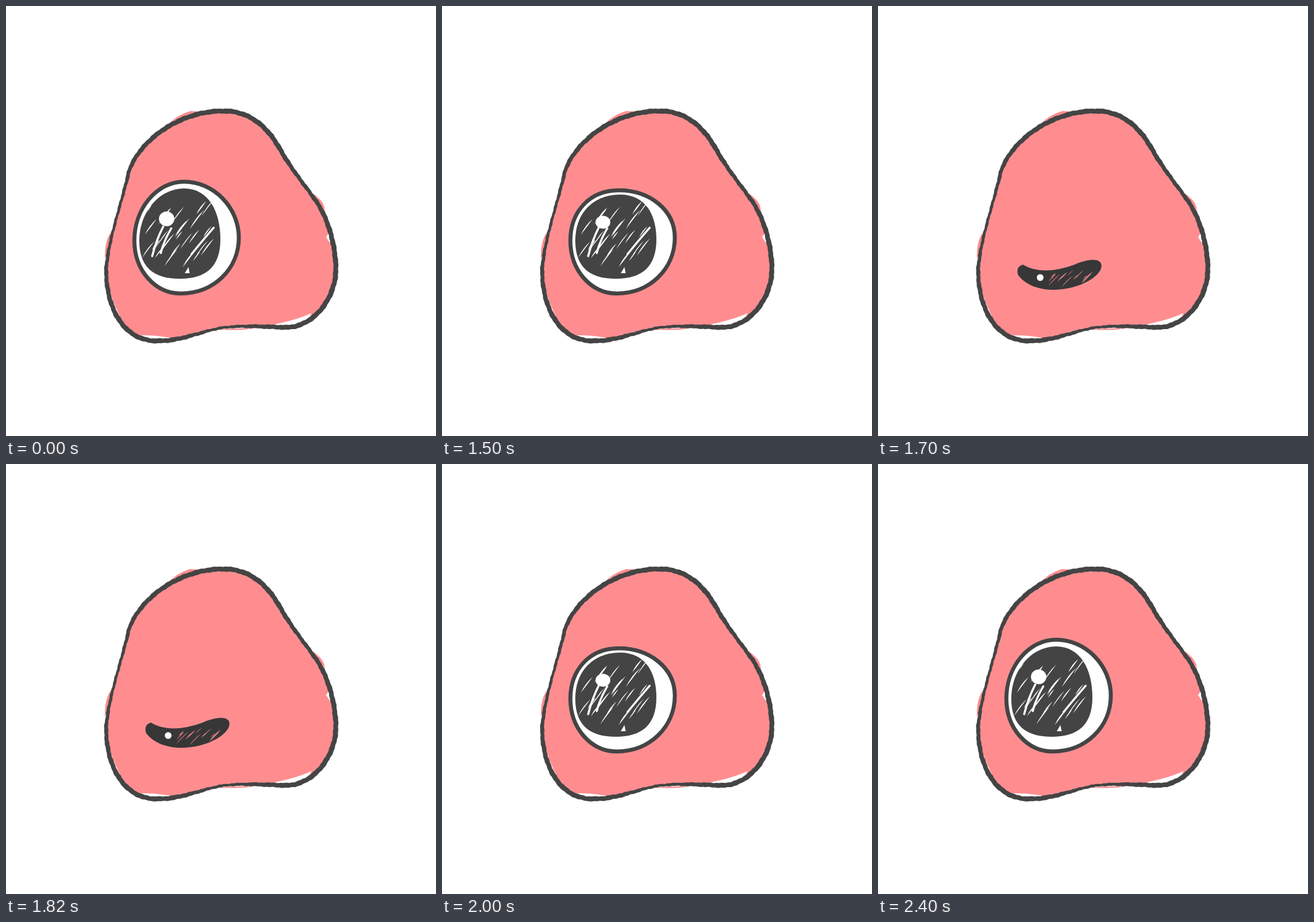
Recreate the animation shown at these times as an HTML page. Size 700x700 px, loop 2600 ms.

```html
<!DOCTYPE html>
<html lang="en">
<head>
<meta charset="utf-8">
<title>Blinking blob</title>
<style>
  html, body { margin: 0; width: 100%; height: 100%; overflow: hidden; background: #fff; }
  svg { display: block; width: 100vw; height: 100vh; }
  .ink { fill: #444; }
  .dark { fill: #373737; }
  .white { fill: #fff; }
  .skin { fill: #ff8d90; }
  .rim { fill: #fff; stroke: #444; stroke-width: 6.5; }
  .glint { fill: none; stroke: #fff; stroke-width: 3.4; stroke-linecap: round; }
  .pose { visibility: hidden; animation: 2600ms step-end infinite; }
  .open { animation-name: open; }
  .squint { animation-name: squint; }
  .half { animation-name: half; }
  .shut { animation-name: shut; }
  @keyframes open {
    0%, 80.769%, 100% { visibility: visible; }
    57.692% { visibility: hidden; }
  }
  @keyframes squint {
    0%, 61.538%, 80.769%, 100% { visibility: hidden; }
    57.692%, 76.923% { visibility: visible; }
  }
  @keyframes half {
    0%, 65.384%, 76.923%, 100% { visibility: hidden; }
    61.538%, 73.077% { visibility: visible; }
  }
  @keyframes shut {
    0%, 73.077%, 100% { visibility: hidden; }
    65.384% { visibility: visible; }
  }
</style>
</head>
<body>
<svg viewBox="0 0 700 700">
  <defs>
    <path id="pupil" d="M217 382C217 335 250 297 290 297C330 297 349 335 349 380C349 425 325 444 283 444C240 444 217 425 217 382Z"/>
    <path id="lowPupil" d="M217 382C217 335 248 307 290 307C330 307 349 338 349 380C349 425 325 444 283 444C240 444 217 425 217 382Z"/>
    <path id="halfPupil" d="M236 394Q290 388 346 387C358 420 340 455 296 455C255 455 226 430 232 400Z"/>
    <path id="slit" d="M236 421Q268 440 320 421C350 408 370 412 362 430C345 460 260 480 228 438Q224 424 236 421Z"/>
    <clipPath id="inPupil"><use href="#pupil"/></clipPath>
    <clipPath id="inLowPupil"><use href="#lowPupil"/></clipPath>
    <clipPath id="inHalfPupil"><use href="#halfPupil"/></clipPath>
    <clipPath id="inSlit"><use href="#slit"/></clipPath>
    <g id="shine">
      <path id="hatch" class="white"/>
      <path class="glint" d="M256 359Q245 380 238 407M269 362Q257 382 252 402M338 361Q318 384 302 404"/>
      <path class="white" d="M297 425L291 435H299Z"/>
    </g>
  </defs>

  <path id="body" class="skin" d="M355 171C395 171 424 194 446 233C466 268 487 292 507 321C527 352 537 395 537 430C536 478 498 527 450 523C420 522 375 519 345 525C312 532 280 547 240 545C190 542 163 490 163 430C166 382 187 325 200 270C216 220 282 170 355 171Z"/>
  <!-- paint spilling over the line, then paint falling short of it -->
  <path class="skin" d="M258 200Q275 178 300 171L320 172ZM222 230Q197 250 194 288ZM177 362Q160 375 161 412ZM498 304Q525 322 517 340ZM340 526Q375 530 410 524Z"/>
  <path class="white" d="M418 522Q470 513 497 500Q490 522 450 523ZM215 536Q245 535 276 542L240 545ZM165 450Q172 480 188 510L168 475ZM527 368L521 376L530 390Z"/>
  <path id="outline" class="ink" fill-rule="evenodd"/>

  <g class="pose open">
    <path class="rim" d="M209 382C209 330 245 286 290 286C338 286 379 328 379 377C379 428 338 468 285 468C242 468 209 430 209 382Z"/>
    <use href="#pupil" class="ink"/>
    <use href="#shine" clip-path="url(#inPupil)"/>
    <ellipse class="white" cx="261.500" cy="346.500" rx="12.500" ry="12"/>
  </g>

  <g class="pose squint">
    <path class="rim" d="M209 382C209 335 240 300 288 300C338 300 379 332 379 377C379 428 338 468 285 468C242 468 209 430 209 382Z"/>
    <use href="#lowPupil" class="ink"/>
    <use href="#shine" clip-path="url(#inLowPupil)"/>
    <ellipse class="white" cx="262" cy="352" rx="12" ry="10.500"/>
  </g>

  <g class="pose half">
    <path d="M236 313L251 300M238 304L255 295" stroke="#d9797c" stroke-width=".8"/>
    <path class="rim" style="stroke-width:8" d="M224 396Q290 388 350 386C378 384 366 462 292 466C238 466 205 402 224 396Z"/>
    <use href="#halfPupil" class="dark"/>
    <path id="halfHatch" class="white" clip-path="url(#inHalfPupil)"/>
    <ellipse class="white" cx="262.500" cy="415" rx="8" ry="5.500"/>
  </g>

  <g class="pose shut">
    <use href="#slit" class="dark"/>
    <path id="slitHatch" fill="#e98386" clip-path="url(#inSlit)"/>
    <circle class="white" cx="264" cy="442" r="5.500"/>
  </g>
</svg>
<script>
  const $ = id => document.getElementById(id);
  const draw = (id, d) => $(id).setAttribute('d', d);

  // Pencil pressure: the line thins out near three spots.
  function pressure({ x, y }) {
    const near = (cx, cy, r) => Math.exp(-((x - cx) ** 2 + (y - cy) ** 2) / r ** 2);
    return 8 - 3.6 * near(180, 345, 100) - 3.6 * near(355, 524, 60) - 1.8 * near(485, 290, 55);
  }

  // One side of the pencil line along a closed path.
  function edge(path, side) {
    const total = path.getTotalLength(), step = 3, pts = [];
    for (let s = 0; s < total; s += step) {
      const p = path.getPointAtLength(s);
      const q = path.getPointAtLength((s + 1) % total);
      const angle = Math.atan2(q.y - p.y, q.x - p.x);
      const rough = .3 * (Math.sin(s * .63 + side) + Math.sin(s * .24 - side));
      const off = side * (pressure(p) / 2 + rough);
      pts.push([p.x + Math.sin(angle) * off, p.y - Math.cos(angle) * off]);
    }
    return 'M' + pts.join('L') + 'Z';
  }

  // Loose, tapering strokes that start in a box and run down to the left.
  function hatch({ seed, count, x, y, w, h, angle, length, width }) {
    const rand = () => (seed = seed * 16807 % 2147483647) / 2147483647;
    const a = angle * Math.PI / 180;
    let d = '';
    for (let i = 0; i < count; i++) {
      const len = length * (.4 + .6 * rand()), fat = width * (.5 + .5 * rand());
      const x0 = x + w * (i + rand()) / count, y0 = y + h * rand();
      const dx = -len * Math.cos(a), dy = len * Math.sin(a);
      const bend = k => `${x0 + dx * .55 + k * fat} ${y0 + dy * .45 + k * fat}`;
      d += `M${x0} ${y0}Q${bend(-1)} ${x0 + dx} ${y0 + dy}Q${bend(1)} ${x0} ${y0}Z`;
    }
    return d;
  }

  draw('outline', edge($('body'), 1) + edge($('body'), -1));
  draw('hatch', hatch({ seed: 4217, count: 26, x: 236, y: 312, w: 108, h: 92, angle: 53, length: 42, width: 1.7 }));
  draw('halfHatch', hatch({ seed: 913, count: 13, x: 276, y: 398, w: 74, h: 28, angle: 36, length: 44, width: 1.8 }));
  draw('slitHatch', hatch({ seed: 577, count: 12, x: 284, y: 423, w: 70, h: 18, angle: 45, length: 30, width: 1.1 }));
</script>
</body>
</html>
```
